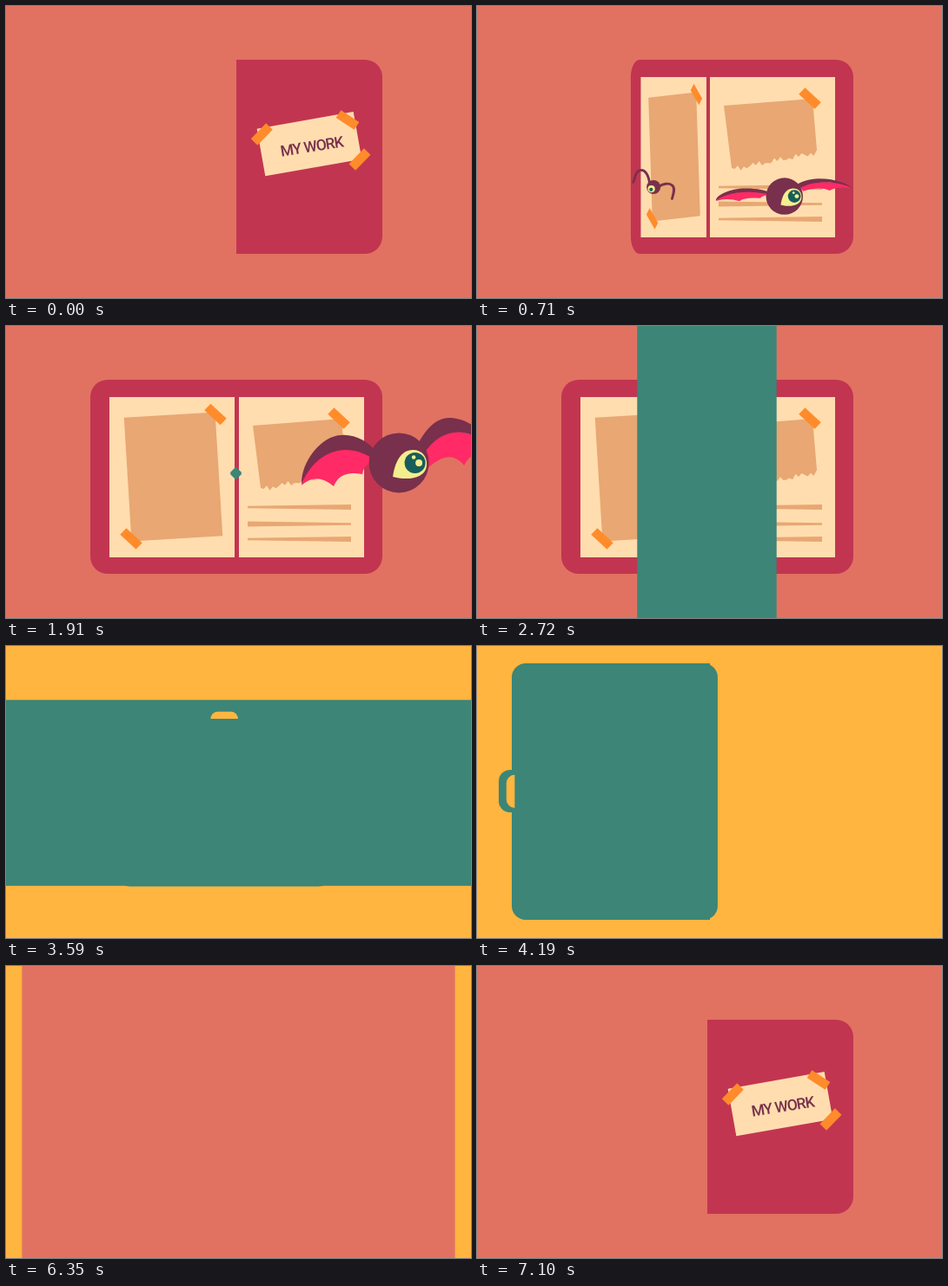
An HTML page with a canvas that plays this animation: 535x337 px, repeating every 7.16 s.

```html
<!DOCTYPE html>
<html lang="en">
<head>
<meta charset="utf-8">
<title>My work</title>
<style>
html, body { margin: 0; width: 100%; height: 100%; overflow: hidden; background: #e17262; }
canvas { display: block; }
</style>
</head>
<body>
<canvas id="stage" width="535" height="337"></canvas>
<script>
const ctx = document.getElementById('stage').getContext('2d');
const W = 535, H = 337, LOOP = 7160;
const C = {
  coral: '#e17262', crimson: '#c23551', cream: '#ffddaf', tan: '#e8a773', tape: '#ff8b2b',
  plum: '#78304c', pink: '#ff2a66', lemon: '#f4ee8f', iris: '#175e5b', teal: '#3c8577', amber: '#ffb53f'
};

const clamp = v => Math.max(0, Math.min(1, v));
const part = (t, from, to) => clamp((t - from) / (to - from));
const inOut = p => p < .5 ? 2 * p * p : 1 - 2 * (1 - p) ** 2;
const out = p => 1 - (1 - p) ** 3;
const mix = (a, b, p) => a + (b - a) * p;

function rect(color, x0, y0, x1, y1, radius = 0) {
  ctx.fillStyle = color;
  ctx.beginPath();
  ctx.roundRect(x0, y0, x1 - x0, y1 - y0, radius);
  ctx.fill();
}
function poly(color, points) {
  ctx.fillStyle = color;
  ctx.beginPath();
  points.forEach(p => ctx.lineTo(...p));
  ctx.fill();
}
function disc(color, x, y, r) {
  ctx.fillStyle = color;
  ctx.beginPath();
  ctx.arc(x, y, r, 0, 7);
  ctx.fill();
}
function shape(color, path) {
  ctx.fillStyle = color;
  ctx.fill(new Path2D(path));
}
function placed(x, y, angle, sx, sy, draw) {
  ctx.save();
  ctx.translate(x, y);
  ctx.rotate(angle * Math.PI / 180);
  ctx.scale(sx, sy);
  draw();
  ctx.restore();
}
// Scales horizontally around a vertical hinge
function hinged(x, k, draw) {
  placed(x, 0, 0, k, 1, () => { ctx.translate(-x, 0); draw(); });
}
function card(color, x, y, angle, w, h) {
  placed(x, y, angle, 1, 1, () => rect(color, -w / 2, -h / 2, w / 2, h / 2));
}
const tape = (x, y, angle) => card(C.tape, x, y, angle, 25, 10.5);

function frontCover() {
  rect(C.crimson, 265, 62, 433, 286, [0, 20, 20, 0]);
  card(C.cream, 349, 159.2, -10, 112.7, 55.5);
  tape(294.3, 148, -46);
  tape(393, 131.5, 33);
  tape(407, 177, -46);
  placed(351.5, 162, -9, 1, 1, () => {
    ctx.fillStyle = C.plum;
    ctx.textAlign = 'center';
    ctx.textBaseline = 'middle';
    ctx.letterSpacing = '-1px';
    ctx.font = '500 17.5px Roboto, sans-serif';
    ctx.fillText('MY WORK', 0, 1);
  });
}

function leftSpread() {
  rect(C.crimson, 97, 62, 265.5, 286, [20, 0, 0, 20]);
  rect(C.cream, 119, 82, 263, 267);
  card(C.tan, 192.5, 174, -3.5, 105, 143);
  tape(241, 102, 43);
  tape(144, 245.5, 43);
}

function textBar(y, left, right) {
  poly(C.tan, [[278, y - left], [397, y - right], [397, y + right], [278, y + left]]);
}

function rightSpread() {
  rect(C.crimson, 265, 62, 433, 286, [0, 20, 20, 0]);
  rect(C.cream, 268, 82, 412, 267);
  const photo = [[284, 115], [386, 107]];
  for (let x = 391; x >= 291; x -= 3.5) {
    photo.push([x, 169 + (391 - x) * .2 + 2.5 * Math.sin(x * .75) + 1.5 * Math.sin(x * .25)]);
  }
  poly(C.tan, photo);
  tape(383, 106.5, 43);
  textBar(209, 1.2, 3);
  textBar(228.5, 3, 1.2);
  textBar(246, 1.2, 3);
}

function book(t) {
  const k = Math.cos(Math.PI * inOut(part(t, 490, 860)));
  if (k < 1) rightSpread();
  if (k > 0) hinged(265, k, frontCover);
  else hinged(265, -k, leftSpread);
}

const flap = (t, period) => (1 - Math.cos((t - 1190) / period * 2 * Math.PI)) / 2;
const wing = (x, y, s, draw) => placed(x, y, 0, 1 + .25 * s, 1 - .8 * s, draw);

function bat(t) {
  const q = (t - 1190) / 720, rush = Math.max(0, q - 1) ** 2;
  const x = 393 + 59 * q + 210 * rush, y = 195 - 37 * q - 105 * rush;
  const size = out(part(t, 640, 900)), s = flap(t, 360);
  placed(x, y, 0, size, size, () => {
    wing(-27, -3, s, () => {
      shape(C.pink, 'M0 0C-30 -28 -75 -12 -85 29Q-68 13 -48 30Q-41 11 -15 16Q-14 5 0 0Z');
      shape(C.plum, 'M4 -5C-6 -22 -24 -30 -39 -29C-62 -29 -86 2 -85 28C-74 -2 -40 -28 0 0Z');
    });
    wing(23, -20, s, () => {
      shape(C.pink, 'M87 12C65 -23 28 -25 5 5L10 26Q36 2 52 23Q62 2 87 12Z');
      shape(C.plum, 'M-4 4C6 -18 20 -33 36 -32C62 -31 80 -9 87 12C66 -23 28 -25 6 9Z');
    });
    disc(C.plum, 0, 0, 34.5);
    shape(C.lemon, 'M-7 16C-5 0 2 -15 16 -15C27 -15 32 -7 32 1C32 20 6 20 -7 16Z');
    disc(C.iris, 18.5, 0, 12);
    disc(C.lemon, 23, 0, 4);
    disc(C.lemon, 17, -6.5, 2.3);
  });
}

function bug(t) {
  const dt = t - 1190, size = out(part(t, 640, 850)), s = flap(t, 240);
  placed(69 - .28 * dt, 300 + .19 * dt, 0, size, size, () => {
    ctx.strokeStyle = C.plum;
    ctx.lineWidth = 4;
    ctx.lineCap = 'round';
    wing(-6, -4, s, () => ctx.stroke(new Path2D('M0 0C-2 -16 -8 -26 -17 -23C-25 -20 -23 -10 -27 -4')));
    wing(8, 0, s, () => ctx.stroke(new Path2D('M0 0C7 -6 17 -7 22 -3C28 2 24 11 22 19')));
    disc(C.plum, 0, 0, 11.3);
    disc(C.lemon, -3.5, 3, 5.8);
    disc(C.iris, -4, 4, 3);
  });
}

// A diamond grows steadily, splits into two tips, then its column sweeps wide
function spread(color, x, y, near, pull, slow, fast) {
  const w = near * slow + (270 - near) * inOut(fast);
  const d = pull * w * w;
  for (const cy of [y - d, y + d]) poly(color, [[x, cy - w], [x + w, cy], [x, cy + w], [x - w, cy]]);
  rect(color, x - w, y - d, x + w, y + d);
}

function handle() {
  rect(C.teal, 25, 143, 50, 192, [13, 0, 0, 13]);
  rect(C.amber, 30, 148.5, 40, 187, [10, 0, 0, 10]);
}

function folderLeft() {
  handle();
  rect(C.teal, 40, 20, 256, 316, 16);
}

function folder(t) {
  const p = inOut(part(t, 3590, 4060));
  const turn = inOut(part(t, 4100, 4640));
  const k = Math.cos(Math.PI * turn);
  const size = mix(.82, 1, p);
  placed(mix(251, 159, p), mix(181.6, 168, p), 90 * (1 - p), size, size, () => {
    ctx.translate(-159, -168);
    folderLeft();
    rect(C.teal, 244, 20, mix(276, 292, turn), 316, 16);
    if (turn > 0) {
      rect(C.cream, 55, 36, 264, 304);
      rect(C.tan, 67, 48, 252, 273);
      rect(C.tan, 67, 285, 171, 291);
    }
    if (k > 0) {
      hinged(268, k, () => {
        handle();
        rect(C.teal, 40, 20, 268, 316, [16, 0, 0, 16]);
      });
    } else {
      hinged(268, k, folderLeft);
      hinged(268, -k, () => {
        rect(C.cream, 272, 36, 481, 304);
        for (let i = 0; i < 3; i++) rect(C.tan, 284, 48 + i * 84.5, 469, 123 + i * 84.5);
      });
    }
  });
}

function bookScene(t) {
  rect(C.coral, 0, 0, W, H);
  book(t);
  bug(t);
  spread(C.teal, 264.5, 170, 65.5, .03, part(t, 1835, 2630), part(t, 2630, 3110));
  bat(t);
}

function folderScene(t) {
  rect(C.amber, 0, 0, W, H);
  const half = 169 * (1 - part(t, 3560, 3645));
  rect(C.teal, 0, 169.5 - half, W, 169.5 + half);
  folder(t);
  spread(C.coral, 267.5, 168.5, 56.5, .0088, part(t, 5050, 5720), part(t, 5720, 6530));
}

function returnScene(t) {
  rect(C.coral, 0, 0, W, H);
  hinged(265, out(part(t, 6815, 7095)), frontCover);
}

const start = performance.now();
function frame() {
  const t = (performance.now() - start) % LOOP;
  if (t < 3580) bookScene(t);
  else if (t < 6530) folderScene(t);
  else returnScene(t);
  requestAnimationFrame(frame);
}
frame();
</script>
</body>
</html>
```
